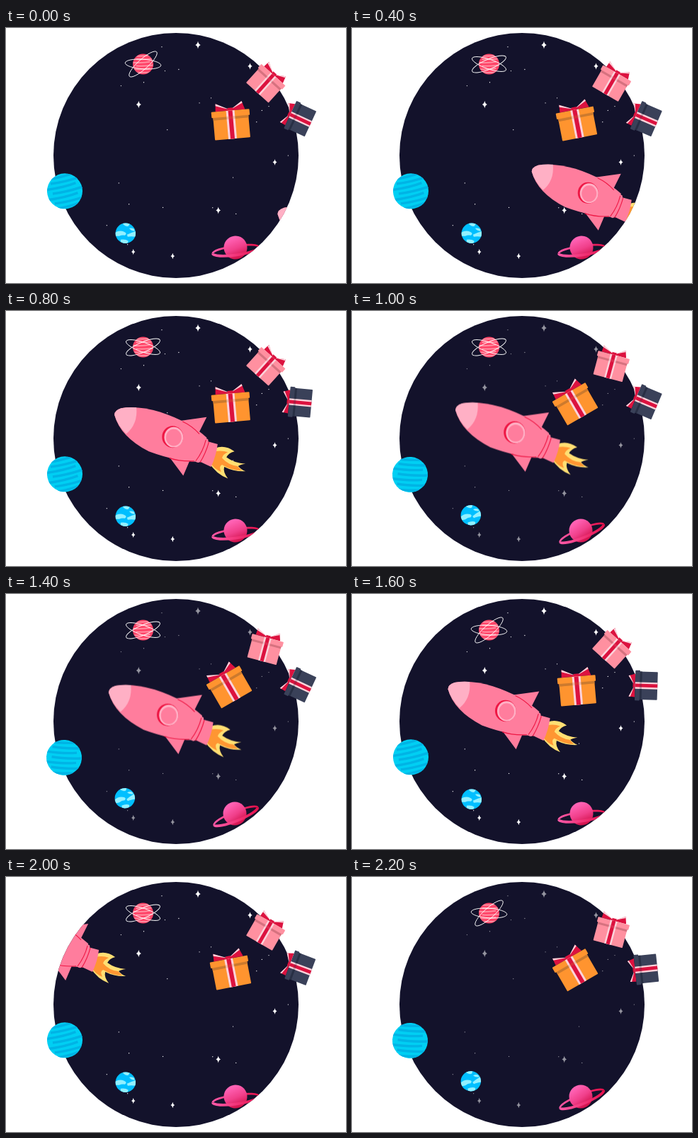
An HTML page for the animation above (2.4 s loop, 480 by 360 pixels).

```html
<!DOCTYPE html>
<html lang="en">
<head>
<meta charset="utf-8">
<title>Gifts in space</title>
<style>
  html, body { margin: 0; width: 100%; height: 100%; overflow: hidden; background: #fff; }
  svg { display: block; width: 480px; height: 360px; }
</style>
</head>
<body>
<svg viewBox="0 0 480 360" xmlns="http://www.w3.org/2000/svg">
  <defs>
    <clipPath id="sky"><circle cx="240" cy="180" r="173"/></clipPath>
    <clipPath id="disc25"><circle r="25"/></clipPath>
    <clipPath id="disc14"><circle r="14.2"/></clipPath>
    <linearGradient id="saturnFill" x1=".35" y1="0" x2=".6" y2="1">
      <stop offset=".1" stop-color="#ff62b4"/><stop offset=".55" stop-color="#f03f8a"/><stop offset="1" stop-color="#cf0d45"/>
    </linearGradient>
    <linearGradient id="ringFill" gradientUnits="userSpaceOnUse" x1="-34" y1="0" x2="34" y2="0">
      <stop offset="0" stop-color="#ff5aa8"/><stop offset="1" stop-color="#e40f4a"/>
    </linearGradient>
    <g id="bow">
      <path d="M0-22L-20-33L-21-22Z M0-22L17-34L21-22Z" fill="#dc123f"/>
      <path d="M0-23L-20-33L-20.3-30Z M0-23L17-34L18-31.5Z" fill="#fbd3db"/>
      <path d="M-4-26H4L3-21H-3Z" fill="#dc123f"/>
    </g>
    <g id="ribbon">
      <path d="M-6-22H6V18H-6Z" fill="#fbd3db"/>
      <path d="M-3-22H3V18H-3Z" fill="#dc123f"/>
    </g>
  </defs>

  <circle cx="240" cy="180" r="173" fill="#13122b"/>
  <g clip-path="url(#sky)">
    <g id="stars"></g>

    <g transform="translate(193.5 51)">
      <circle r="14.5" fill="#ff4468"/>
      <g clip-path="url(#disc14)" id="thinBands" fill="none" stroke="#ff93a5" stroke-width="1.8"></g>
      <g fill="none" stroke="#fff" stroke-width=".9">
        <ellipse id="orbitA" rx="25.3" ry="6.8"/>
        <ellipse id="orbitB" rx="25.8" ry="7"/>
      </g>
    </g>

    <g id="globe">
      <circle r="14.2" fill="#00bfff"/>
      <g clip-path="url(#disc14)" fill="#92f0ff">
        <path d="M-5-15Q-1-9 4-10L7-15Z M-15-1Q-8-5-2-2Q3 0-1 3Q-5 2-9 4L-15 4Z M2 2Q8-1 15-3V5Q7 4 3 5Z M-7 9Q0 8 4 11L2 15H-7Z M5-7Q9-8 12-6L13-3Q8-3 5-7Z"/>
      </g>
    </g>

    <g id="saturn" fill="none" stroke="url(#ringFill)">
      <path d="M-33 4A33 6.5 0 0 1 33 4" stroke-width="2.8"/>
      <circle r="16.5" fill="url(#saturnFill)" stroke="none"/>
      <path d="M-33 4A33 6.5 0 0 0 33 4" stroke-width="3.8"/>
    </g>

    <g id="rocket">
      <path d="M57 15Q70 9 84 19Q76 21 73 27Q84 35 99 36Q92 37 89 39Q93 44 99 46Q84 47 70 40Q68 47 75 56Q59 50 49 34Z" fill="#ffdf73"/>
      <path d="M56 19Q67 17 75 20Q68 23 67 28Q76 38 88 39L94 45Q80 45 67 37Q62 39 66 47Q56 43 51 34Z" fill="#ff9632"/>
      <path d="M10-23L46-28L35-6Z M-4 28L14 52L23 31Z" fill="#ff7d9d"/>
      <path d="M46 5L61 9Q59 25 52 40L37 33Z" fill="#ff7d9d"/>
      <path d="M-80-31Q-80-37-71-40Q-49-44-18-35Q22-22 46 0Q46 20 34 33Q5 33-33 19Q-72-1-80-31Z" fill="#ff7d9d"/>
      <path d="M-80-31Q-80-37-71-40Q-61-42-50-41Q-48-18-64-5Q-76-17-80-31Z" fill="#ffb0c5"/>
      <path d="M45 2Q49 1 48 6Q44 21 37 33Q34 36 30 32Q40 17 45 2Z" fill="#ff7d9d"/>
      <path d="M13-22Q26-16 36-5M-5 28Q10 33 29 32M45 3Q41 19 31 32M49 6Q45 21 37 34" fill="none" stroke="#ee1744" stroke-width="1.1"/>
      <ellipse cx="-.5" cy="-1" rx="14.5" ry="15" fill="#ee1744"/>
      <ellipse cx="1" cy="-.5" rx="13" ry="14" fill="#ffb0c5"/>
      <ellipse cx="1" cy="0" rx="10.5" ry="11.5" fill="#ff7d9d"/>
    </g>
  </g>

  <g id="bluePlanet">
    <circle r="25" fill="#00cff3"/>
    <g clip-path="url(#disc25)" id="wideBands" fill="none" stroke="#00b4e5" stroke-width="3.4"></g>
  </g>
  <g id="gifts"></g>
</svg>
<script>
const STEP = 200, STEPS = 12;
const $ = id => document.getElementById(id);
const place = (el, x, y, angle = 0, scale = 1) =>
  el.setAttribute('transform', `translate(${x} ${y}) rotate(${angle}) scale(${scale})`);
const mix = (a, b, k) => a + (b - a) * k;
const repeat = (count, make) => Array.from({ length: count }, (_, i) => make(i)).join('');

// Stars: a few large sparkles, and scattered specks.
let seed = 7;
const random = () => (seed = seed * 16807 % 2147483647) / 2147483647;
const sparkles = [[271, 24], [187.3, 108], [299.7, 257.5], [344.5, 54], [379.5, 189.5], [235.3, 322], [179.7, 316]];
const sparkle = ([x, y], i) => {
  const r = 5.4 - i * 0.25, q = r * 0.16, w = r * 0.7;
  return `<path transform="translate(${x} ${y})" fill="#fff"
    d="M0 ${-r}Q${q} ${-q} ${w} 0Q${q} ${q} 0 ${r}Q${-q} ${q} ${-w} 0Q${-q} ${-q} 0 ${-r}Z"/>`;
};
const speck = () => {
  const angle = random() * 2 * Math.PI, r = 165 * Math.sqrt(random());
  return `<circle cx="${240 + r * Math.cos(angle)}" cy="${180 + r * Math.sin(angle)}" r=".65" fill="#fff"/>`;
};
$('stars').innerHTML = sparkles.map(sparkle).join('') + repeat(22, speck);

// Planet bands: gently bowed lines, every other one cut short.
const bands = (count, radius) => repeat(count, i => {
  const y = radius * (2 * (i + 0.5) / count - 1), left = -radius * (i % 2 ? 0.7 : 1.1);
  return `<path d="M${left} ${y}Q0 ${y + radius * 0.08} ${left + 1.8 * radius} ${y - 1}"/>`;
});
$('wideBands').innerHTML = bands(7, 25);
$('thinBands').innerHTML = bands(6, 14);

// dx is the box centre's offset from its pivot.
const gifts = [
  { x: 365, y: 80, dx: 0, scale: 0.85, fill: '#ff90a0', shade: '#d5727f',
    angle: step => step % 2 ? 15 : 36 + 6 * Math.cos(step * Math.PI / 2) },
  { x: 417, y: 129.5, dx: 0, scale: 0.79, fill: '#3a4159', shade: '#292f45',
    angle: step => -80 + 17 * Math.cos((213.75 * step - 29) * Math.PI / 180) },
  { x: 306.5, y: 139.5, dx: 12, scale: 1, fill: '#ff942f', shade: '#cc7a2e',
    angle: step => step % 2 ? -30 : -8 + 3 * Math.cos(step * Math.PI / 2) }
];
for (const gift of gifts) {
  $('gifts').insertAdjacentHTML('beforeend', `<g><g transform="translate(${gift.dx} 0)">
    <use href="#bow"/>
    <rect x="-25" y="-15" width="50" height="33" rx="1" fill="${gift.fill}"/>
    <rect x="-25" y="-14" width="50" height="4" fill="${gift.shade}"/>
    <rect x="-27" y="-22" width="54" height="8.5" rx="1" fill="${gift.fill}"/>
    <use href="#ribbon"/>
    <path d="M-25-14H25V-10H-25Z" fill="${gift.shade}" opacity=".25"/>
  </g></g>`);
  gift.el = $('gifts').lastElementChild;
}

// A ramp that starts from rest: about 0 below zero, about x above it.
const softRamp = x => 0.35 * Math.log(1 + Math.exp(x / 0.35));

// Rocket: steady entry along an arc, hover in the middle, fast exit.
function placeRocket(step) {
  const before = 65 * softRamp(3.6 - step);
  const after = 92 * softRamp(step - 8.27);
  const x = 229.5 + before - after;
  const y = 172 + 0.46 * before + 14 * (1 - Math.exp(-before / 20)) - 0.49 * after;
  place($('rocket'), x, y, 0, 1 + 0.05 * Math.exp(-(before + after) / 15));
}

function draw(time) {
  const step = Math.floor(time / STEP) % STEPS;
  const odd = step % 2;
  const openOrbits = step % 8 % 3 === 0;

  $('stars').setAttribute('opacity', odd ? 0.55 : 1);
  place($('orbitA'), 0, 0, openOrbits ? 4 : 19);
  place($('orbitB'), 0, 0, openOrbits ? -42 : -23);
  place($('globe'), 168.8 - odd, 289.8 - odd * 1.6, odd * -14);
  place($('saturn'), 324 - odd, 310, odd ? -22 : -8);
  place($('bluePlanet'), 83 - odd, 230.3 + odd * 0.7, mix(-12, 4, odd));
  placeRocket(step);
  for (const { el, x, y, angle, scale } of gifts) place(el, x, y, angle(step), scale);
}

const start = performance.now();
function tick() {
  draw(performance.now() - start);
  requestAnimationFrame(tick);
}
tick();
</script>
</body>
</html>
```
